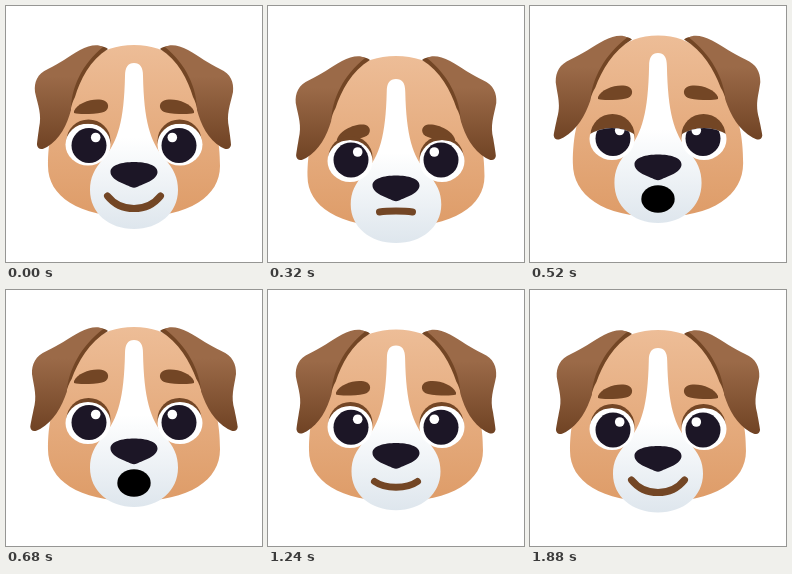
An HTML page that plays this animation: 256x256 px, repeating every 1920 ms.

```html
<!DOCTYPE html>
<html lang="en">
<head>
<meta charset="utf-8">
<title>Puppy face</title>
<style>
html, body { margin: 0; height: 100%; overflow: hidden; background: #fff; }
svg { display: block; width: 100vw; height: 100vh; }
</style>
</head>
<body>
<svg viewBox="0 0 256 256">
  <defs>
    <linearGradient id="fur" x2="0" y2="1"><stop stop-color="#edbd97"/><stop offset="1" stop-color="#de9c68"/></linearGradient>
    <linearGradient id="white" x2="0" y2="1"><stop offset=".45" stop-color="#fff"/><stop offset="1" stop-color="#dee6ed"/></linearGradient>
    <linearGradient id="flap" x2="0" y2="1"><stop offset=".3" stop-color="#9b6a48"/><stop offset="1" stop-color="#704324"/></linearGradient>
    <clipPath id="opening"><path id="lid"/></clipPath>
  </defs>
  <path id="head" fill="url(#fur)" d="M128 39C92 39 72 60 62 92C46 112 42 135 42 160C42 190 72 211 128 211S214 190 214 160C214 135 210 112 194 92C184 60 164 39 128 39Z"/>
  <path id="muzzle" fill="url(#white)" d="M128 57C122 57 119 61 119 70C118 115 112 135 98 152C88 163 84 172 84 184C84 207 103 223 128 223S172 207 172 184C172 172 168 163 158 152C144 135 138 115 137 70C137 61 134 57 128 57Z"/>
  <g id="side">
    <g id="ear">
      <path fill="#734625" d="M102 43C94 37 84 41 74 56L60 112C66 106 64 100 69 91C74 74 84 54 102 43Z"/>
      <path fill="url(#flap)" d="M97 41C92 38 83 39 74 44C62 51 54 57 42 63C31 68 28 76 29 86C32 100 36 108 33 122C32 130 31 136 31 139C32 144 36 144 41 141C54 133 61 119 65 104C65 82 76 58 97 41Z"/>
    </g>
    <path id="brow" fill="#734625" d="M-18 4C-14 -5 4 -10 13 -6C18 -3 17 4 10 5.5C2 7 -12 8 -18 6Z"/>
    <g id="eye">
      <ellipse cx=".5" cy="-4" rx="22" ry="21" fill="#734625"/>
      <g clip-path="url(#opening)">
        <ellipse rx="22.5" ry="21" fill="#fff"/>
        <g id="pupil">
          <circle r="17.5" fill="#1c1626"/>
          <circle cx="6.7" cy="-8" r="4.8" fill="#fff"/>
        </g>
      </g>
    </g>
  </g>
  <use href="#side" transform="matrix(-1 0 0 1 256 0)"/>
  <path id="nose" fill="#1c1626" d="M-23.5 -3C-23.5 -10 -12 -13 0 -13S23.5 -10 23.5 -3C23.5 5 9 9 3 12Q0 13.5 -3 12C-9 9 -23.5 5 -23.5 -3Z"/>
  <path id="smile" fill="none" stroke="#734625" stroke-width="7" stroke-linecap="round"/>
  <ellipse id="open" cx="128"/>
</svg>
<script>
const LOOP = 1920, STEP = 40;
const $ = id => document.getElementById(id);
const set = (id, attrs) => {
  for (const k in attrs) $(id).setAttribute(k, attrs[k]);
};
const move = (id, transform) => set(id, { transform });

// Smooth rise from 0 to 1 between times a and b
const ease = (t, a, b) => {
  const p = Math.min(1, Math.max(0, (t - a) / (b - a)));
  return (1 - Math.cos(Math.PI * p)) / 2;
};

function draw(t) {
  // Moods, each a weight from 0 to 1
  const rise = ease(t, 340, 500);
  const settle = ease(t, 1080, 1400);
  const sad = ease(t, 0, 280) - rise;
  const sleepy = rise - ease(t, 530, 680);
  const perk = rise - ease(t, 680, 1000);
  const awe = rise - settle;
  const flare = ease(t, 500, 590) - ease(t, 590, 680);
  const grin = 1 - ease(t, 0, 280) + settle;

  const top = 39 + 11 * sad - 2 * perk - 7.5 * sleepy + settle;
  const bottom = 211 + 10 * sad + settle;
  const widen = 1 + .029 * sad - .01 * sleepy + .023 * settle;
  const muzTop = 57 + 16 * sad - 4 * awe - 3 * perk - 3 * sleepy + settle;
  const muzBottom = 223 + 14 * sad - 5 * awe - perk - .5 * settle;
  const spread = 1.7 * sad + 4 * perk + 3 * flare + 3 * settle;
  const eyeY = 138.5 + 16.5 * sad - 3.5 * awe - 2 * perk + .5 * settle;
  const pupilY = 139.5 + 14.5 * sad - 5 * awe - 2 * perk + .5 * settle;
  const lid = -14 - 5 * awe + 15 * sleepy;

  move('head', `translate(128 ${top}) scale(${widen} ${(bottom - top) / 172}) translate(-128 -39)`);
  move('muzzle', `translate(128 ${muzTop}) scale(${widen} ${(muzBottom - muzTop) / 166}) translate(-128 -57)`);
  move('ear', `translate(98 ${top + 4}) skewX(${-spread}) translate(-98 -43)`);
  move('brow', `translate(86 ${101 + 26 * sad - 6 * awe - 8 * perk + settle}) rotate(${-9 * sad})`);
  move('eye', `translate(82 ${eyeY})`);
  move('pupil', `translate(1 ${pupilY - eyeY})`);
  set('lid', { d: `M-24 ${lid}Q0 ${lid - 14} 24 ${lid}V40H-24Z` });
  move('nose', `translate(128 ${169 + 13.5 * sad - 6 * awe - 1.5 * perk})`);

  const howling = t >= 400 && t < 1160;
  const mouthY = 190 + 16 * sad + 3 * awe;
  const half = 16.5 + 10 * grin, dip = mouthY - 1.3 + 18 * grin;
  const gape = 15 * awe + 1.7 * perk;
  set('smile', {
    d: `M${128 - half} ${mouthY}C${128 - half / 2} ${dip} ${128 + half / 2} ${dip} ${128 + half} ${mouthY}`,
    visibility: howling ? 'hidden' : 'visible'
  });
  set('open', {
    cy: mouthY, rx: gape, ry: gape * .82,
    visibility: howling ? 'visible' : 'hidden'
  });
}

const start = performance.now();
function tick() {
  const t = (performance.now() - start) % LOOP;
  draw(Math.floor(t / STEP) * STEP);
  requestAnimationFrame(tick);
}
tick();
</script>
</body>
</html>
```
